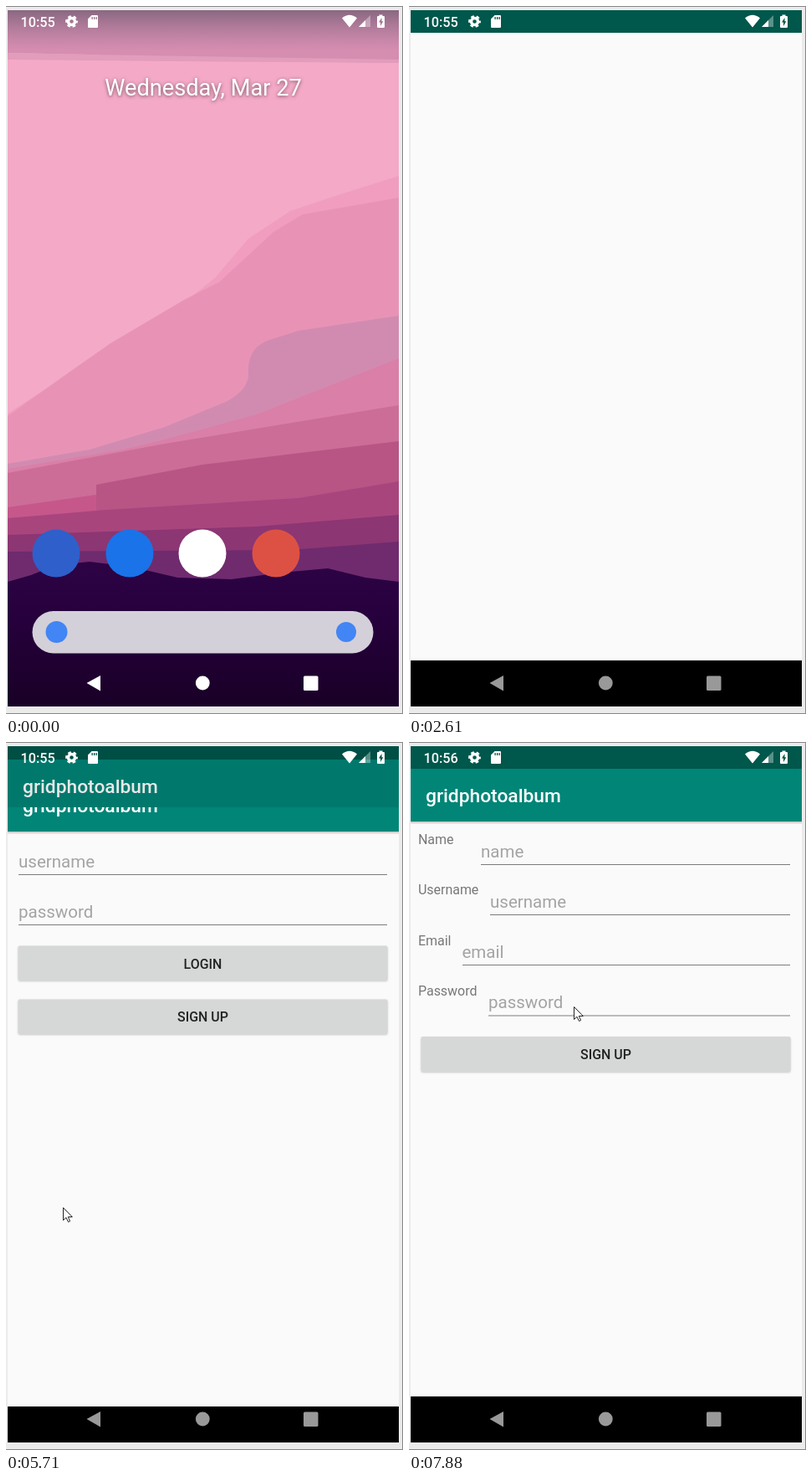
An HTML page without scripts for the animation above (8000 ms loop, 475 by 846 pixels).

```html
<!DOCTYPE html>
<html lang="en">
<head>
<meta charset="utf-8">
<title>Sign-up flow</title>
<style>
html, body { margin: 0; width: 100%; height: 100%; overflow: hidden; background: #ebebeb; }
.stage { position: relative; width: 475px; height: 846px; box-sizing: border-box; overflow: hidden;
  border: solid #858585; border-width: 1px 1px 1px 0; }
.screen { position: absolute; left: 2px; top: 4px; width: 468px; height: 832px; overflow: hidden; background: #000; }
.screen svg { position: absolute; inset: 0; width: 468px; height: 832px; animation: 8s step-end infinite; }
text { font-family: Roboto, "Open Sans", sans-serif; }
.title { font-size: 22.8px; font-weight: 500; fill: #fff; }
.btn rect { fill: #d6d7d7; filter: drop-shadow(0 1.5px 1px #0003); animation: 8s step-end infinite; }
.btn text { font-size: 15.94px; font-weight: 500; fill: #222; text-anchor: middle; }
.hint { font-size: 20.5px; fill: #a4a4a4; }
.label { font-size: 15.94px; fill: #777; }
.line { stroke: #7c7c7c; fill: none; }
.time { font-size: 16.2px; font-weight: 500; fill: #fff; }
.a { animation: 8s step-end infinite; }

.launch { animation-name: launch !important; }
.post { animation-name: post !important; }
.login { animation-name: login !important; }
.signup { animation-name: signup !important; }
.out { animation-name: pressOut !important; }
.up { animation-name: pressUp !important; }
.nav { animation-name: nav; }
.cursor { animation-name: cursor; }
.before { animation-name: before; }
.after { animation-name: after; }

@keyframes launch {
  0% { opacity: 0; transform: scale(.9); }
  12.5% { opacity: .66; transform: scale(.9); }
  14.375% { opacity: .95; transform: scale(.975); }
  15.875%, 100% { opacity: 1; transform: none; }
}
@keyframes nav {
  0% { fill: #fff; }
  20.75% { fill: #efefef; }
  22.75% { fill: #e0e0e0; }
  24.25% { fill: #d2d2d2; }
  26% { fill: #c0c0c0; }
  29% { fill: #aaa; }
  32.625%, 100% { fill: #999; }
}
@keyframes post {
  0% { opacity: 0; }
  36.25% { opacity: .75; }
  38.125% { opacity: 1; transform: none; filter: none; }
  71.375% { opacity: 1; transform: translateY(-11px); filter: brightness(.91); }
  72.875%, 100% { opacity: 1; transform: translateY(-16px); filter: brightness(.9); }
}
@keyframes login {
  0% { opacity: 0; }
  71.375% { opacity: 1; transform: translateY(12px); clip-path: inset(61px 0 0); }
  72.875% { opacity: 1; transform: translateY(2px); clip-path: inset(6px 0 0); }
  74.375% { opacity: 1; transform: none; clip-path: none; filter: none; }
  95.125% { opacity: 1; transform: translateY(-3px); filter: brightness(.97); }
  96.625%, 100% { opacity: 1; transform: translateY(-13px); filter: brightness(.91); }
}
@keyframes signup {
  0% { opacity: 0; }
  95.125% { opacity: 1; transform: translateY(27px); clip-path: inset(320px 0 0); }
  96.625% { opacity: 1; transform: translateY(7px); clip-path: inset(38px 0 0); }
  98.5%, 100% { opacity: 1; transform: none; clip-path: none; }
}
@keyframes pressOut {
  0% { fill: #d6d7d7; }
  59.5% { fill: #bfc0c0; filter: drop-shadow(0 2px 2px #0005); }
  64.5% { fill: #cbcccc; }
  66.375%, 100% { fill: #d6d7d7; }
}
@keyframes pressUp {
  0% { fill: #d6d7d7; }
  88.75% { fill: #c8c9c9; filter: drop-shadow(0 2px 2px #0005); }
  90.25% { fill: #bfc0c0; filter: drop-shadow(0 2px 2px #0005); }
  91.75% { fill: #cbcccc; }
  93.25%, 100% { fill: #d6d7d7; }
}
@keyframes before { 0% { opacity: 1; } 77.375%, 100% { opacity: 0; } }
@keyframes after { 0% { opacity: 0; } 77.375%, 100% { opacity: 1; } }
@keyframes cursor {
  0% { opacity: 0; transform: translate(447px, 727px); }
  41.25% { opacity: 1; transform: translate(447px, 727px); }
  43.125% { transform: translate(322px, 708px); }
  44.625% { transform: translate(195px, 682px); }
  46.125% { transform: translate(135px, 636px); }
  47.625% { transform: translate(102px, 602px); }
  51.125% { transform: translate(96px, 592px); }
  52.625% { transform: translate(89px, 580px); }
  54.5% { transform: translate(78px, 567px); }
  56% { transform: translate(68px, 556px); }
  74.375% { transform: translate(78px, 535px); }
  75.875% { transform: translate(108px, 470px); }
  77.375% { transform: translate(145px, 402px); }
  78.875% { transform: translate(172px, 360px); }
  80.375% { transform: translate(188px, 337px); }
  81.875% { transform: translate(195px, 323px); }
  83.75% { transform: translate(197px, 322px); }
  96.625%, 100% { transform: translate(197px, 316px); }
}
</style>
</head>
<body>
<div class="stage"><div class="screen">

<!-- home -->
<svg viewBox="2 5 468 832">
  <defs>
    <linearGradient id="scrim" x2="0" y2="1">
      <stop stop-color="#4a4a5a" stop-opacity=".55"/>
      <stop offset="1" stop-color="#806080" stop-opacity="0"/>
    </linearGradient>
    <linearGradient id="hill" x2="0" y2="1">
      <stop stop-color="#2d0345"/>
      <stop offset=".4" stop-color="#26003c"/>
      <stop offset="1" stop-color="#190026"/>
    </linearGradient>
    <g id="base">
      <path fill="#fafafa" d="M2 32h468v750H2z"/>
      <path fill="#00574b" d="M2 5h468v27H2z"/>
      <path d="M2 782h468v60H2z"/>
    </g>
    <g id="app">
      <use href="#base"/>
      <path fill="#0001" d="M2 95h468v3H2z"/>
      <path fill="#0002" d="M2 95h468v1.500H2z"/>
      <path fill="#008577" d="M2 32h468v63H2z"/>
      <text class="title" x="20" y="72">gridphotoalbum</text>
    </g>
  </defs>
  <path fill="#f4a9c7" d="M2 5h468v832H2z"/>
  <path fill="#d58db0" d="M2 5H470V68L200 64 100 58 2 56z"/>
  <path fill="#e29cbc" d="M100 58L470 64V68L200 66 2 64V56z"/>
  <path fill="#f09dc0" d="M2 487L90 430 200 365 250 325 290 278 340 245 400 225 470 203V837H2z"/>
  <path fill="#e893b6" d="M2 490L75 438 125 403 215 350 255 330 320 270 355 249 470 229V837H2z"/>
  <path fill="#d28bb0" d="M2 547L100 530 190 503 265 472Q290 458 290 440 288 408 315 399L350 388 470 370V837H2z"/>
  <path fill="#dc7ca6" d="M2 553L140 530 190 518 300 488 470 421V837H2z" opacity=".8"/>
  <path fill="#cc6d97" d="M2 558L190 523 330 500 470 477V837H2z"/>
  <path fill="#c6578b" d="M2 599L108 584V837H2z"/>
  <path fill="#b85585" d="M108 572L235 548 470 520V837H108z"/>
  <path fill="#a9457d" d="M2 612L120 602 350 588 470 568V837H2z"/>
  <path fill="#8c3673" d="M2 632L300 622 470 608V837H2z"/>
  <path fill="#6f2b6e" d="M2 652L340 650 470 640V837H2z"/>
  <path fill="url(#hill)" d="M2 688L30 680 60 668 100 664 150 670 205 683 270 685 330 677 385 672 430 683 470 688V837H2z"/>
  <path fill="url(#scrim)" d="M2 5h468v48H2z"/>
  <text x="236" y="107" font-size="27.200" fill="#fff" text-anchor="middle" style="filter:drop-shadow(0 1px 2px #0008)">Wednesday, Mar 27</text>
  <circle cx="60" cy="654" r="28.500" fill="#2f5fcb"/>
  <circle cx="148" cy="654" r="28.500" fill="#1a73e8"/>
  <circle cx="235" cy="654" r="28.500" fill="#fff"/>
  <circle cx="323" cy="654" r="28.500" fill="#dd5144"/>
  <rect x="31.500" y="723" width="408" height="50.500" rx="25.250" fill="#d3d0d9"/>
  <circle cx="60.500" cy="748" r="13" fill="#4285f4"/>
  <circle cx="407" cy="748" r="12" fill="#4285f4"/>
</svg>

<svg class="launch" viewBox="2 5 468 832"><use href="#base"/></svg>

<!-- new post -->
<svg class="post" viewBox="2 5 468 832">
  <use href="#app"/>
  <text class="hint" x="26" y="140">Description</text>
  <path class="line" d="M26 148.500H445"/>
  <g class="btn">
    <rect x="26" y="173.500" width="419" height="41.500" rx="2"/>
    <text x="235.500" y="200.500">TAKE PICTURE</text>
    <rect x="26" y="474.500" width="419" height="41.500" rx="2"/>
    <text x="235.500" y="501">SUBMIT</text>
    <rect class="out" x="26" y="538" width="91.500" height="42" rx="2"/>
    <text x="71.700" y="564.500">LOGOUT</text>
  </g>
</svg>

<svg class="login" viewBox="2 5 468 832">
  <use href="#app"/>
  <text class="hint" x="15" y="138">username</text>
  <text class="hint" x="15" y="198">password</text>
  <path class="line" d="M15 146.500H456M15 206.500H456"/>
  <g class="btn">
    <rect x="14.500" y="231.500" width="442" height="41.500" rx="2"/>
    <text x="235.500" y="258.500">LOGIN</text>
    <rect class="up" x="14.500" y="295.500" width="442" height="41.500" rx="2"/>
    <text x="235.500" y="322">SIGN UP</text>
  </g>
</svg>

<svg class="signup" viewBox="2 5 468 832">
  <use href="#app"/>
  <g class="label">
    <text x="11" y="122">Name</text>
    <text x="11" y="182">Username</text>
    <text x="11" y="242.500">Email</text>
    <text x="11" y="302.500">Password</text>
  </g>
  <g class="hint">
    <text x="86" y="138">name</text>
    <text x="97" y="198">username</text>
    <text x="63.500" y="258">email</text>
    <text x="95" y="318">password</text>
  </g>
  <path class="line" d="M86 146.500H456M97 206.500H456M64 266.500H456M95 327H456"/>
  <g class="btn">
    <rect x="14.500" y="352" width="442" height="42" rx="2"/>
    <text x="235.500" y="379">SIGN UP</text>
  </g>
</svg>

<!-- system bars and pointer -->
<svg viewBox="2 5 468 832">
  <text class="time a before" x="17.500" y="24.500">10:55</text>
  <text class="time a after" x="17.500" y="24.500">10:56</text>
  <g fill="none" stroke="#fff">
    <circle cx="78.500" cy="18.500" r="4" stroke-width="3.400"/>
    <circle cx="78.500" cy="18.500" r="6.200" stroke-width="2.400" stroke-dasharray="3.600 2.893" stroke-dashoffset="1.800"/>
  </g>
  <path fill="#fff" fill-rule="evenodd" d="M102.500 11H109Q110 11 110 12V25Q110 26 109 26H99Q98 26 98 25V15.500zM102.500 13v3h1.300v-3zM105 13v3h1.300v-3zM107.500 13v3h1.300v-3z"/>
  <path fill="#fff" d="M402 14.500Q411 7 420 14.500L411 25.500z"/>
  <path fill="#fff" opacity=".35" d="M436 11V25H422z"/>
  <path fill="#fff" d="M430 17V25H422z"/>
  <path fill="#fff" fill-rule="evenodd" d="M446.500 10.500h4V12H452Q453 12 453 13V25Q453 26 452 26H445Q444 26 444 25V13Q444 12 445 12H446.500zM449.500 14L446 19.500H448V24L451.300 18.200H449.500z"/>
  <g class="a nav">
    <path d="M96.500 809L113 800V818.500z"/>
    <circle cx="235.300" cy="809" r="8.400"/>
    <rect x="356" y="800.500" width="17.500" height="17.500" rx="1.500"/>
  </g>
  <path class="a cursor" fill="#fff" stroke="#222" d="M.5 .5V15.500L4 12.300 6.500 17.500 8.600 16.600 6.300 11.500H11.300z"/>
</svg>

</div></div>
</body>
</html>
```
